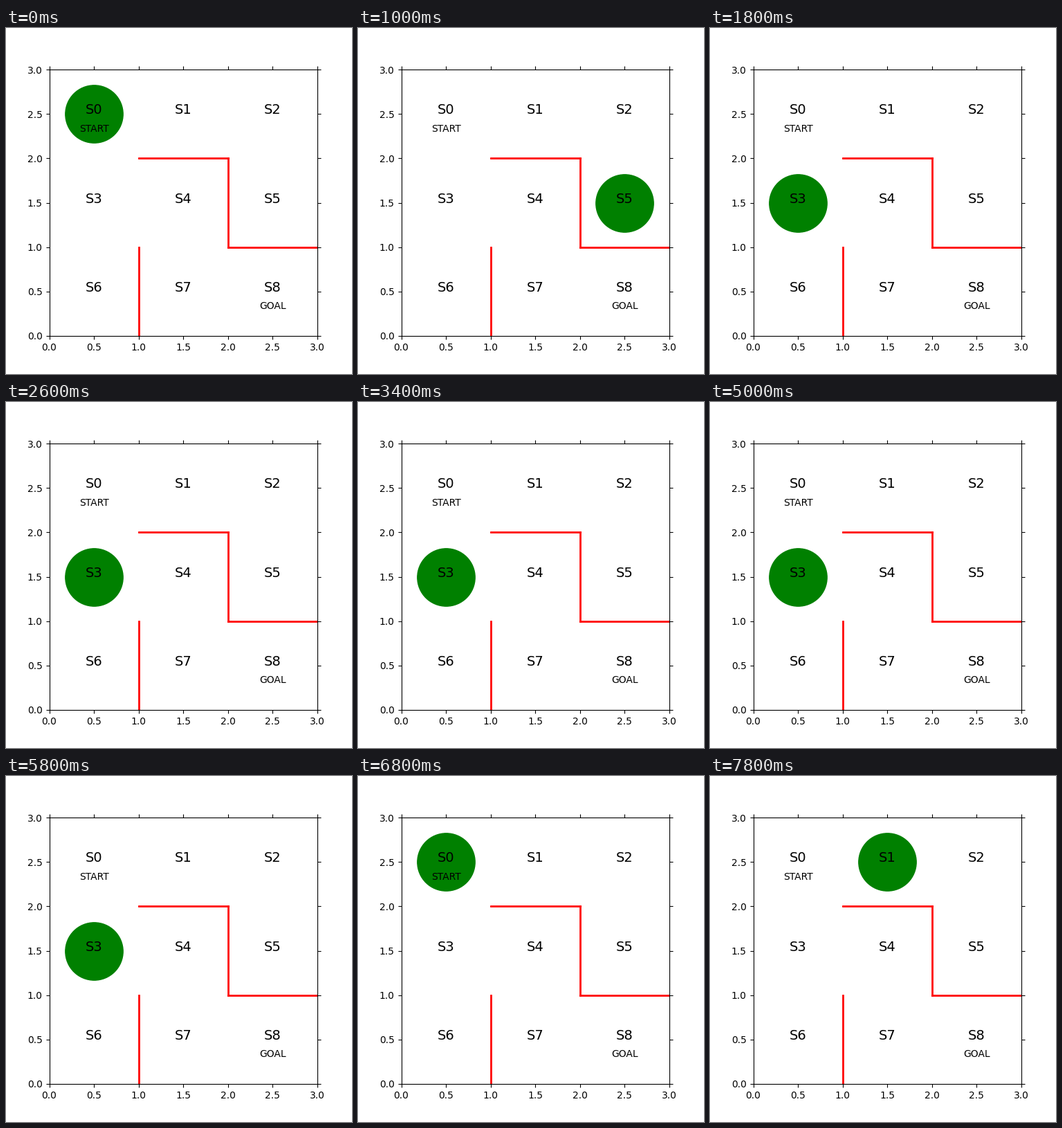
These frames come from a looping animation (500x500 px, 8 s). A matplotlib script:

```python
import matplotlib.pyplot as plt
from matplotlib.animation import FuncAnimation

STEP_MS = 200
# Cells the agent visits, one per step
WALK = "0121252103036343436363630343436303010301"
WALLS = [([1, 1], [0, 1]), ([1, 2], [2, 2]), ([2, 2], [2, 1]), ([2, 3], [1, 1])]


def center(cell):
    row, col = divmod(cell, 3)
    return col + 0.5, 2.5 - row


plt.rcParams["font.family"] = "DejaVu Sans"
fig = plt.figure(figsize=(5, 5), dpi=100, facecolor="white")
ax = fig.add_subplot()

for xs, ys in WALLS:
    ax.plot(xs, ys, color="red", linewidth=2)

for cell in range(9):
    x, y = center(cell)
    ax.text(x, y, f"S{cell}", size=14, ha="center")
ax.text(0.5, 2.3, "START", ha="center")
ax.text(2.5, 0.3, "GOAL", ha="center")

ax.set_xlim(0, 3)
ax.set_ylim(0, 3)
ax.tick_params(axis="both", top=True, right=True)

agent, = ax.plot([0.5], [2.5], marker="o", color="g", markersize=60)


def update(step):
    x, y = center(int(WALK[step]))
    agent.set_data([x], [y])
    return agent,


anim = FuncAnimation(fig, update, frames=len(WALK), interval=STEP_MS,
                     repeat=True, repeat_delay=0)
plt.show()
```
